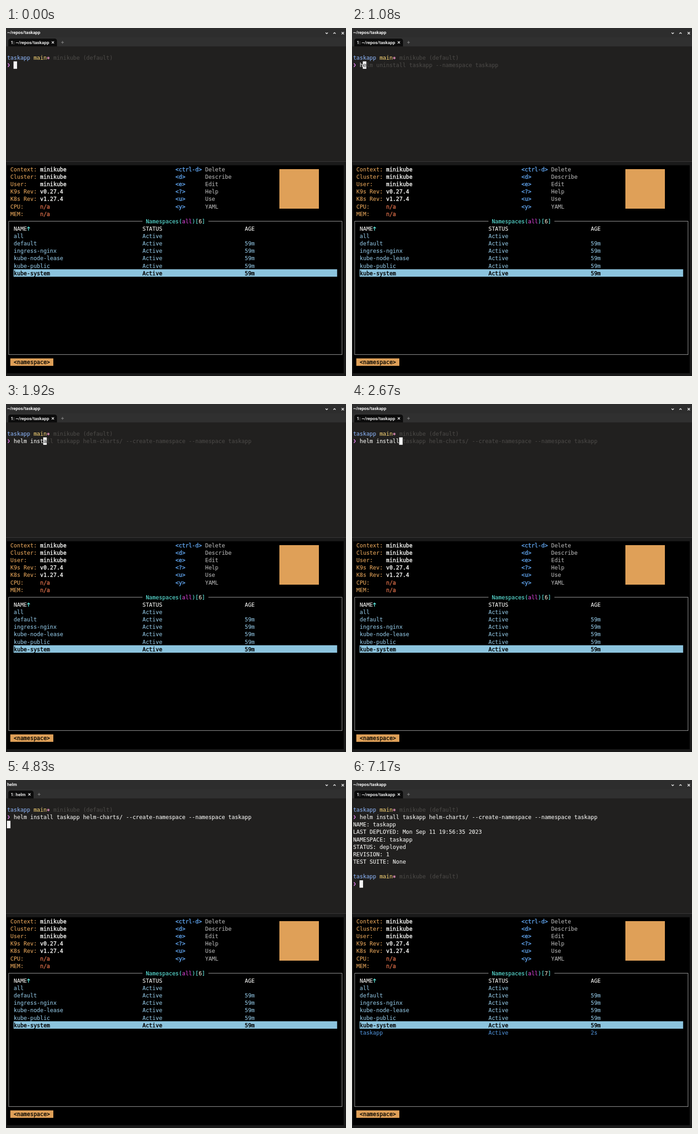
These frames come from a looping animation (740x757 px, 8000 ms). An HTML page with a canvas:

```html
<!DOCTYPE html>
<html lang="en">
<head>
<meta charset="utf-8">
<title>Terminal session</title>
<style>
html, body { margin: 0; width: 100%; height: 100%; overflow: hidden; background: #1a1a1a; }
canvas { display: block; }
</style>
</head>
<body>
<canvas id="stage" width="740" height="757"></canvas>
<script>
const ctx = document.getElementById('stage').getContext('2d');
const LOOP = 8000;
const CELL = 7.185, LEFT = 2.4;
const MONO = '11.93px "DejaVu Sans Mono", monospace';
const UI = '"Roboto", sans-serif';

const INSTALL = 'helm install taskapp helm-charts/ --create-namespace --namespace taskapp';
const UNINSTALL = 'helm uninstall taskapp --namespace taskapp';

// Times at which one more character of the command has been typed.
const KEYS = [1080, 1170, 1330, 1420, 1500, 1670, 1750, 1830, 1920, 2000, 2080, 2170];
const ACCEPT = 3420, RUN = 4830, DONE = 5500, LISTED = 7170;

const C = {
  back: '#21201f', white: '#eeeeec', dim: '#4a4846', blue: '#86abea', yellow: '#eac870',
  pink: '#e08eb8', prompt: '#d278dc', orange: '#dfa058', red: '#cb6644', key: '#5b9be0',
  grey: '#b0b0b0', aqua: '#5ee6dc', magenta: '#d444d4', row: '#8cbeda', pick: '#8cc4de', fresh: '#4c8acc'
};

const colX = col => LEFT + col * CELL;
const topY = row => 64.6 + row * 16.17;
const lowY = row => 307.6 + row * 16.13;

function box(x, y, w, h, color) {
  ctx.fillStyle = color;
  ctx.fillRect(x, y, w, h);
}

function line(points, color, width) {
  ctx.beginPath();
  points.forEach(([x, y], i) => i ? ctx.lineTo(x, y) : ctx.moveTo(x, y));
  ctx.strokeStyle = color;
  ctx.lineWidth = width;
  ctx.stroke();
}

// Monospaced text on the cell grid, centred on y; a thin outline gives the medium weight.
function mono(text, col, y, color, strong) {
  ctx.font = MONO;
  ctx.fillStyle = ctx.strokeStyle = color;
  ctx.lineWidth = strong ? 0.5 : 0.15;
  ctx.lineJoin = 'round';
  [...text].forEach((ch, i) => {
    if (ch === ' ') return;
    ctx.fillText(ch, colX(col + i), y + 4.3);
    ctx.strokeText(ch, colX(col + i), y + 4.3);
  });
}

function label(text, x, y, color, size) {
  ctx.font = `bold ${size}px ${UI}`;
  ctx.fillStyle = color;
  ctx.fillText(text, x, y);
}

function cross(x, y, r, color, width) {
  line([[x - r, y - r], [x + r, y + r]], color, width);
  line([[x - r, y + r], [x + r, y - r]], color, width);
}

function chrome(title) {
  const end = title === 'helm' ? 60 : 111;
  box(0, 0, 740, 20, '#2d2d2d');
  box(0, 20, 740, 20, '#303030');
  label(title, 2.5, 13.2, '#f4f4f4', 9.6);
  line([[695.5, 10], [698, 12.5], [700.5, 10]], '#e6e6e6', 1.6);
  line([[712.5, 12.5], [715, 10], [717.5, 12.5]], '#e6e6e6', 1.6);
  cross(733, 11.3, 2.5, '#e6e6e6', 1.6);

  ctx.beginPath();
  ctx.roundRect(5, 23, end - 5, 17, [5, 5, 0, 0]);
  ctx.fillStyle = '#0c0c0c';
  ctx.fill();
  label('1: ' + title, 10.3, 34.6, '#e8e8e8', 9.7);
  cross(end - 9, 31.3, 2.4, '#dddddd', 1.4);
  line([[end + 9, 31.3], [end + 15, 31.3]], '#8a8a8a', 1.1);
  line([[end + 12, 28.3], [end + 12, 34.3]], '#8a8a8a', 1.1);
}

function prompt(row) {
  const y = topY(row);
  mono('taskapp', 0, y, C.blue);
  mono('main', 8, y, C.yellow);
  mono('∗', 12, y, C.pink, true);
  mono('minikube (default)', 14, y, C.dim);
  const p = topY(row + 1);
  line([[4.3, p - 4], [7.2, p], [4.3, p + 4]], C.prompt, 1.9);
}

function cursor(col, row, under) {
  const y = topY(row);
  box(colX(col) - 0.4, y - 8.2, CELL + 0.5, 16.2, '#f5f5f5');
  if (under) mono(under, col, y, '#3a3a3a');
}

function shell(t) {
  box(0, 40, 740, 250, C.back);
  prompt(0);
  const count = t >= ACCEPT ? INSTALL.length : KEYS.filter(k => t >= k).length;
  const hint = count < 6 ? UNINSTALL : INSTALL;
  if (count) {
    mono(hint.slice(0, count), 2, topY(1), C.white);
    mono(hint.slice(count), 2 + count, topY(1), C.dim);
  }
  if (t < RUN) {
    cursor(2 + count, 1, count ? hint[count] : '');
  } else if (t < DONE) {
    cursor(0, 2);
  } else {
    ['NAME: taskapp', 'LAST DEPLOYED: Mon Sep 11 19:56:35 2023', 'NAMESPACE: taskapp',
      'STATUS: deployed', 'REVISION: 1', 'TEST SUITE: None']
      .forEach((s, i) => mono(s, 0, topY(2 + i), C.white));
    prompt(9);
    cursor(2, 10);
  }
}

function header() {
  [['Context:', 'minikube'], ['Cluster:', 'minikube'], ['User:', 'minikube'],
    ['K9s Rev:', 'v0.27.4'], ['K8s Rev:', 'v1.27.4'], ['CPU:', 'n/a'], ['MEM:', 'n/a']]
    .forEach(([name, value], i) => {
      mono(name, 1, lowY(i), C.orange);
      mono(value, 10, lowY(i), value === 'n/a' ? C.red : C.white, true);
    });
  [['<ctrl-d>', 'Delete'], ['<d>', 'Describe'], ['<e>', 'Edit'],
    ['<?>', 'Help'], ['<u>', 'Use'], ['<y>', 'YAML']]
    .forEach(([key, action], i) => {
      mono(key, 51, lowY(i), C.key, true);
      mono(action, 60, lowY(i), C.grey);
    });
  box(595, 307, 86, 86, C.orange);
}

function tableRow(row, cells, color, strong) {
  [2, 41, 72].forEach((col, i) => mono(cells[i], col, lowY(row), color, strong));
}

function sortArrow(x, y) {
  line([[x, y + 4.2], [x, y - 3.6]], C.aqua, 1.5);
  line([[x - 2.8, y - 0.8], [x, y - 3.8], [x + 2.8, y - 0.8]], C.aqua, 1.5);
}

function table(t) {
  const listed = t >= LISTED;
  line([[297, 420.4], [5.8, 420.4], [5.8, 710.4], [731.4, 710.4], [731.4, 420.4], [440.5, 420.4]], '#8c8c8c', 1.2);
  const y = lowY(7);
  mono('Namespaces(', 42, y, C.aqua);
  mono('all', 53, y, C.magenta);
  mono(')[', 56, y, C.aqua);
  mono(listed ? '7' : '6', 58, y, '#efe3cf');
  mono(']', 59, y, C.aqua);

  tableRow(8, ['NAME', 'STATUS', 'AGE'], C.white);
  sortArrow(colX(6.5), lowY(8));
  ['all', 'default', 'ingress-nginx', 'kube-node-lease', 'kube-public']
    .forEach((name, i) => tableRow(9 + i, [name, 'Active', i ? '59m' : ''], C.row));
  box(16.5, 524.8, 704.2, 16.2, C.pick);
  tableRow(14, ['kube-system', 'Active', '59m'], '#050505', true);
  if (listed) tableRow(15, ['taskapp', 'Active', '2s'], C.fresh);

  box(9.4, 718.7, 93.6, 16.2, C.orange);
  mono('<namespace>', 2, lowY(26), '#141008', true);
}

function draw(t) {
  box(0, 0, 740, 757, '#1a1a1a');
  chrome(t >= RUN && t < DONE ? 'helm' : '~/repos/taskapp');
  shell(t);
  box(0, 290, 740, 1, '#3c3c3c');
  box(2, 298.5, 733, 452.5, '#000');
  header();
  table(t);
}

function tick() {
  draw(performance.now() % LOOP);
  requestAnimationFrame(tick);
}
tick();
</script>
</body>
</html>
```
